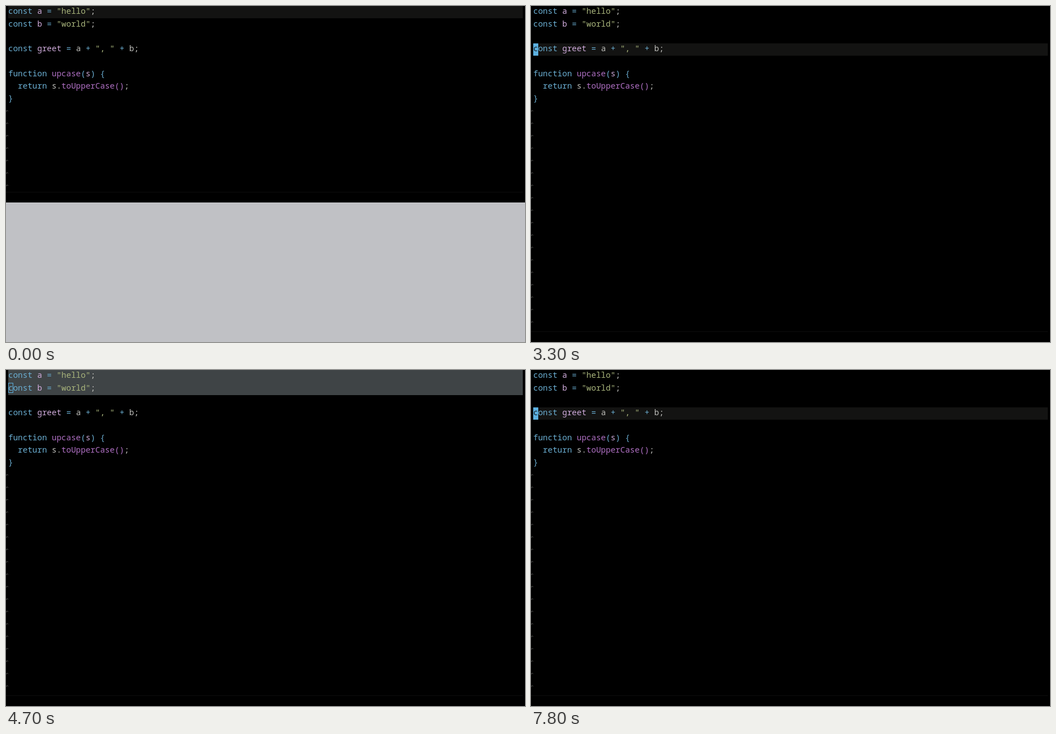
Animation of 930 by 602 pixels, one loop 8000 ms. Source, as an HTML page with a canvas:

```html
<!DOCTYPE html>
<html lang="en">
<head>
<meta charset="utf-8">
<title>Editor session</title>
<style>
html, body { margin: 0; width: 100%; height: 100%; overflow: hidden; background: #000; }
canvas { display: block; }
</style>
</head>
<body>
<canvas id="stage" width="930" height="602"></canvas>
<script>
const ctx = document.getElementById('stage').getContext('2d');
const LOOP = 8000, LEFT = 4, RIGHT = 926, ROW = 22.25, CELL = 8.67;

const color = {
  key: '#6bafd3', str: '#a9b57c', name: '#d0acdc', fn: '#b070c4', fg: '#bebeba',
  line: '#131312', region: '#3f4446', cursor: '#5cb0e0', mark: '#555553',
  rule: '#0e0e0e', desk: '#c0c1c5', note: '#dcc896', noteEdge: '#dcbf9c', noteBack: '#171717'
};

// Each line is a run of [style, text] pairs.
const code = [
  [['key', 'const '], ['name', 'a '], ['key', '= '], ['str', '"hello"'], ['fg', ';']],
  [['key', 'const '], ['name', 'b '], ['key', '= '], ['str', '"world"'], ['fg', ';']],
  [],
  [['key', 'const '], ['name', 'greet '], ['key', '= '], ['fg', 'a '], ['key', '+ '],
   ['str', '", " '], ['key', '+ '], ['fg', 'b;']],
  [],
  [['key', 'function '], ['fn', 'upcase'], ['key', '('], ['name', 's'], ['key', ') {']],
  [['key', '  return '], ['fg', 's.'], ['fn', 'toUpperCase()'], ['fg', ';']],
  [['key', '}']]
];

// State changes, each merged over the ones before it.
const script = [
  { at: 0, row: 0, cursor: 'none', split: true, region: 0, echo: '', note: false },
  { at: 300, split: false },
  { at: 400, cursor: 'box' },
  { at: 1200, row: 1 },
  { at: 1400, row: 2 },
  { at: 3300, row: 3 },
  { at: 3800, row: 2 },
  { at: 3900, row: 1 },
  { at: 4100, row: 0 },
  { at: 4300, cursor: 'hollow', region: 1, echo: '-- VISUAL LINE --' },
  { at: 4700, row: 1, region: 2, echo: '' },
  { at: 5800, echo: 'SPC m-' },
  { at: 5900, echo: 'SPC m e-' },
  { at: 6100, echo: 'SPC m e r', note: true },
  { at: 7200, cursor: 'box', region: 0, echo: '', note: false },
  { at: 7600, row: 2 },
  { at: 7800, row: 3 }
];

const stateAt = t => Object.assign({}, ...script.filter(s => s.at <= t));
const rowTop = row => Math.round(row * ROW);

function box(fill, x, y, w, h) {
  ctx.fillStyle = fill;
  ctx.fillRect(x, y, w, h);
}

function frame(stroke, x, y, w, h) {
  ctx.strokeStyle = stroke;
  ctx.lineWidth = 1;
  ctx.strokeRect(x + 0.5, y + 0.5, w - 1, h - 1);
}

function text(fill, str, x, y) {
  ctx.fillStyle = fill;
  ctx.fillText(str, x, y);
}

function drawLine(runs, row) {
  let x = LEFT;
  for (const [style, str] of runs) {
    text(color[style], str, x, row * ROW + 14.3);
    x += str.length * CELL;
  }
}

function drawMark(row) {
  const y = row * ROW + 10;
  ctx.strokeStyle = color.mark;
  ctx.lineWidth = 1;
  ctx.beginPath();
  ctx.moveTo(0, y + 1.5);
  ctx.quadraticCurveTo(1.2, y - 1.5, 2.6, y - 0.7);
  ctx.lineTo(4, y + 0.5);
  ctx.stroke();
}

function drawCursor({ row, cursor }) {
  const y = rowTop(row);
  if (cursor === 'hollow') frame(color.cursor, LEFT, y + 1, 9, 18);
  if (cursor === 'box') {
    box(color.cursor, LEFT, y, 9, rowTop(row + 1) - y);
    if (code[row].length) text('#101820', code[row][0][1][0], LEFT, row * ROW + 14.3);
  }
}

function drawNote() {
  box(color.noteBack, 160, 22, 124, 22);
  frame(color.noteEdge, 160, 22, 124, 22);
  text(color.note, '=> undefined', 170, ROW + 14.3);
}

function draw(t) {
  const s = stateAt(t);
  const height = s.split ? 352 : 602;
  box('#000', 0, 0, 930, 602);

  if (s.region) box(color.region, LEFT, 0, RIGHT - LEFT, rowTop(s.region));
  else box(color.line, LEFT, rowTop(s.row), RIGHT - LEFT, rowTop(s.row + 1) - rowTop(s.row));

  ctx.font = '14.45px "Noto Sans Mono", "DejaVu Sans Mono", monospace';
  code.forEach(drawLine);
  drawCursor(s);
  const lastRow = s.split ? 14 : 25;
  for (let row = code.length; row <= lastRow; row++) drawMark(row);

  if (s.note) drawNote();
  box(color.rule, 0, height - 19, RIGHT, 1);
  text(color.fg, s.echo, LEFT, 598);
  if (s.split) box(color.desk, 0, height, 930, 602 - height);
}

const start = performance.now();
function tick() {
  draw((performance.now() - start) % LOOP);
  requestAnimationFrame(tick);
}
tick();
</script>
</body>
</html>
```
